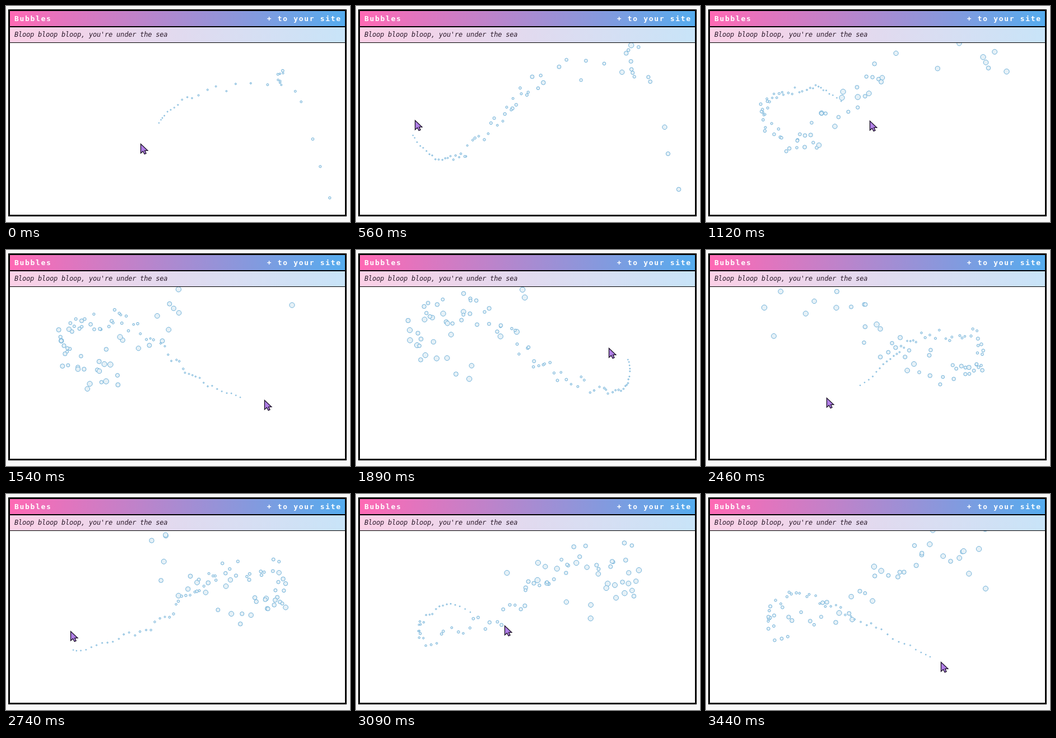
These frames come from a looping animation (614 by 386 pixels, 3510 ms). An HTML page with a canvas:

```html
<!DOCTYPE html>
<html lang="en">
<head>
<meta charset="utf-8">
<title>Bubbles</title>
<style>
  html, body { margin: 0; width: 100%; height: 100%; overflow: hidden; background: #f9f9f9; }
  .card {
    position: absolute; left: 4px; top: 6px; width: 604px; height: 370px;
    box-sizing: border-box; border: 3px solid #000; background: #fff;
    font-family: "DejaVu Sans Mono", "Noto Sans Mono", monospace;
  }
  .head, .note {
    display: flex; justify-content: space-between; box-sizing: border-box;
    padding: 0 8px; white-space: nowrap; line-height: 27px;
  }
  .head {
    height: 29px; border-bottom: 2px solid #000; color: #fff;
    background: linear-gradient(90deg, #ff69b4, #55acee);
    font-size: 13px; font-weight: bold; letter-spacing: 1.67px;
  }
  .head span + span { margin-right: -1.67px; }
  .note {
    height: 28px; border-bottom: 1px solid #000; color: #2b1a2b;
    background: linear-gradient(90deg, #fbd0e6, #c8e4f8);
    font-size: 12px; font-style: italic; letter-spacing: -.22px;
  }
  canvas { position: absolute; left: 0; top: 0; }
</style>
</head>
<body>
<div class="card">
  <div class="head"><span>Bubbles</span><span>+ to your site</span></div>
  <div class="note"><span>Bloop bloop bloop, you're under the sea</span></div>
</div>
<canvas width="614" height="386"></canvas>
<script>
const LOOP = 3510, STEP = 70, LAG = 105, EMIT = 17.2;
const ctx = document.querySelector('canvas').getContext('2d');

// Key points of the pointer's path: time, x, y (it begins before the loop)
const path = [
  [-516, 580, 356], [-447, 512, 165], [-420, 488, 150], [-310, 484, 150], [-258, 410, 158],
  [-172, 333, 170], [-60, 285, 196], [0, 273, 209], [105, 240, 246], [220, 198, 277],
  [340, 165, 284], [450, 130, 270], [555, 101, 230], [665, 105, 204], [800, 131, 178],
  [950, 187, 154], [1080, 225, 161], [1225, 292, 205], [1380, 347, 242], [1535, 420, 264],
  [1645, 461, 268], [1735, 483, 250], [1870, 486, 198], [1985, 455, 176], [2165, 369, 176],
  [2275, 339, 194], [2445, 274, 243], [2635, 170, 275], [2735, 120, 279], [2845, 115, 245],
  [3005, 167, 201], [3090, 210, 214], [3270, 305, 251], [3440, 400, 291], [3545, 419, 300]
];

let seed = 7;
function rand() {
  seed = (seed + 0x6D2B79F5) | 0;
  let h = Math.imul(seed ^ (seed >>> 15), seed | 1);
  h ^= h + Math.imul(h ^ (h >>> 7), h | 61);
  return ((h ^ (h >>> 14)) >>> 0) / 4294967296;
}

function slope(i, k) {
  const a = path[Math.max(i - 1, 0)], b = path[Math.min(i + 1, path.length - 1)];
  return (b[k] - a[k]) / (b[0] - a[0]);
}

// Smooth cubic through the key points
function pointer(t) {
  let i = 0;
  while (i < path.length - 2 && t >= path[i + 1][0]) i++;
  const a = path[i], b = path[i + 1], d = b[0] - a[0];
  const u = Math.min((t - a[0]) / d, 1), v = 1 - u;
  return [1, 2].map(k =>
    v * v * ((1 + 2 * u) * a[k] + u * d * slope(i, k)) +
    u * u * ((1 + 2 * v) * b[k] - v * d * slope(i + 1, k)));
}

// One bubble per tick along the path; life is counted in 60 Hz ticks
const bubbles = [];
for (let t = path[0][0]; t < LOOP; t += EMIT) {
  const [x, y] = pointer(t);
  bubbles.push({
    t, x, y,
    rise: 0.4 + rand(),
    push: (rand() - rand()) / 10,
    sway: (rand() + rand() + rand() - 1.5) * 0.03,
    life: 60 + 60 * rand()
  });
}

function drawBubble(b, t) {
  const n = (t - b.t) * 0.06;
  if (n < 0 || n >= b.life) return;
  const x = b.x + b.push * n + b.sway * n ** 1.5;
  const y = b.y - b.rise * n - n * n / 2400;
  ctx.beginPath();
  ctx.arc(x, y, 4 * (0.2 + n / b.life), 0, 2 * Math.PI);
  ctx.fill();
  ctx.stroke();
}

const arrow = new Path2D('M0 0V16.5L4 13L6.7 18.2L9.6 16.9L7.2 11.8H12.4Z');

function draw(t) {
  ctx.clearRect(0, 0, 614, 386);
  ctx.save();
  ctx.beginPath();
  ctx.rect(7, 66, 598, 307);
  ctx.clip();
  ctx.fillStyle = '#e6f1f7';
  ctx.strokeStyle = '#68acd6';
  ctx.lineWidth = 0.95;
  for (const b of bubbles) drawBubble(b, t);
  ctx.restore();

  const [x, y] = pointer(t + LAG);
  ctx.save();
  ctx.translate(Math.round(x) + 0.5, Math.round(y) + 0.5);
  ctx.fillStyle = '#b07fe6';
  ctx.strokeStyle = '#1c1228';
  ctx.lineWidth = 1.3;
  ctx.fill(arrow);
  ctx.stroke(arrow);
  ctx.restore();
}

// The picture holds for 70 ms, with one longer hold before 2740
function hold(t) {
  return t < 2740
    ? Math.min(Math.floor(t / STEP), 38) * STEP
    : 2740 + Math.floor((t - 2740) / STEP) * STEP;
}

const start = performance.now();
function tick() {
  draw(hold((performance.now() - start) % LOOP));
  requestAnimationFrame(tick);
}
tick();
</script>
</body>
</html>
```
